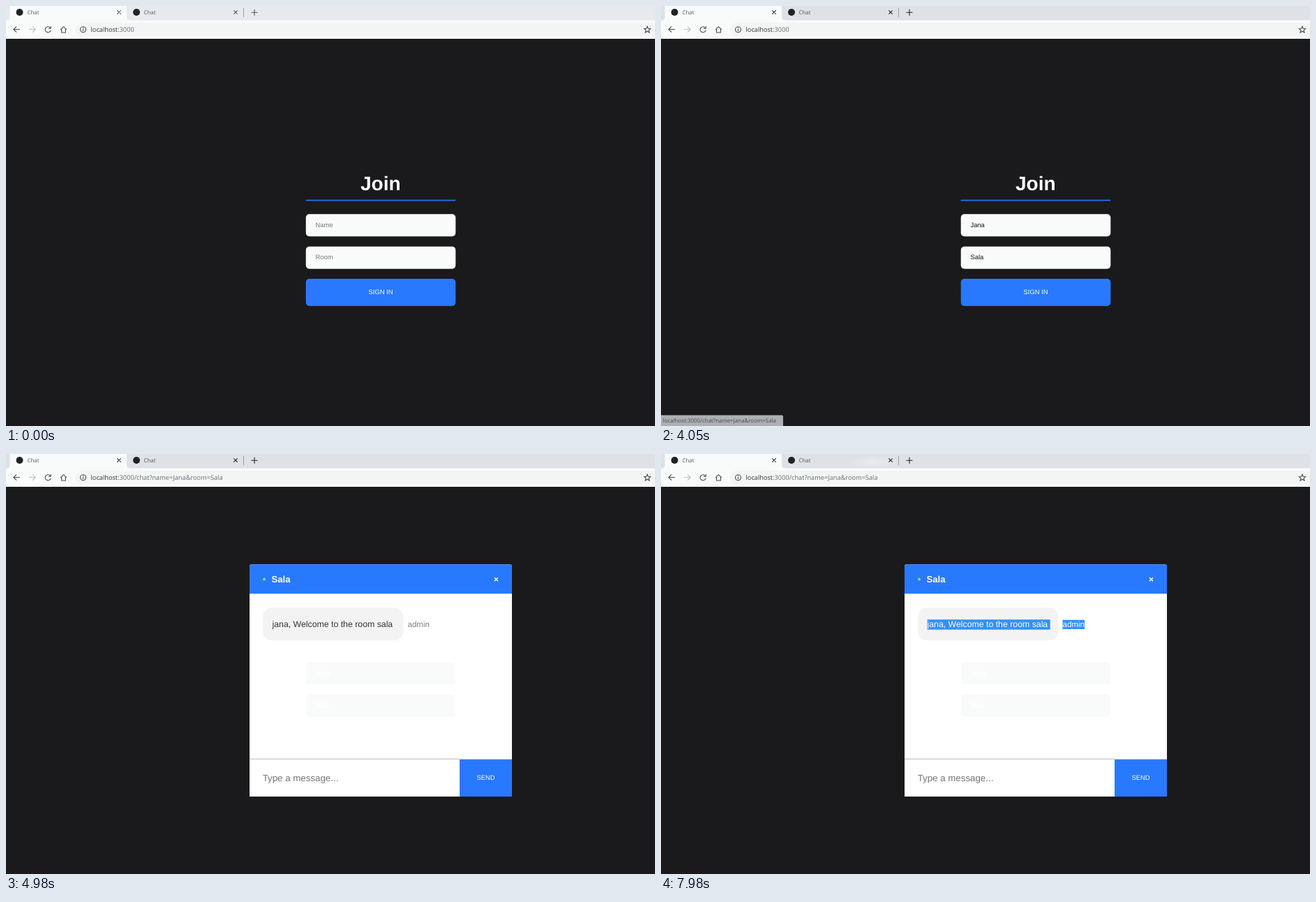
An HTML page for the animation above (8 s loop, 930 px wide and 602 px high).

```html
<!DOCTYPE html>
<html lang="en">
<head>
<meta charset="utf-8">
<title>Chat</title>
<style>
  html, body { margin: 0; width: 100%; height: 100%; overflow: hidden; background: #1a1a1c; }
  svg { display: block; }
  text { font-family: "Liberation Sans", Arial, sans-serif; white-space: pre; text-rendering: geometricPrecision; }
  .ui text, text.ui { font-family: "Open Sans", "Noto Sans", sans-serif; }
  .small { font-size: 9.36px; }
  .bold { font-weight: bold; }
  .message { font-size: 12.3px; }
  .author { font-size: 11.57px; }
  .blue { fill: #2979ff; }
  .white { fill: #fff; }
  .icon { fill: none; stroke: #45494d; stroke-width: 1.1; }
</style>
</head>
<body>
<svg width="930" height="602" viewBox="0 0 930 602">
  <defs>
    <radialGradient id="glow">
      <stop offset="0" stop-color="#eaecef"/>
      <stop offset="1" stop-color="#eaecef" stop-opacity="0"/>
    </radialGradient>
    <clipPath id="selected">
      <rect id="clipMessage" x="381.5" y="237" height="15"/>
      <rect id="clipAuthor" x="575.5" y="237" height="15"/>
    </clipPath>
  </defs>

  <g class="ui">
    <rect id="strip" width="930" height="21"/>
    <rect id="hover" x="266" y="3" width="75" height="17" fill="url(#glow)"/>
    <path d="M2 21Q5.5 20 5.5 16V0H173V16Q173 20 177 21Z" fill="#f9fbfa"/>
    <rect y="20.5" width="930" height="26.5" fill="#f9fbfa"/>
    <rect x="99" y="24" width="850" height="19" rx="9.5" fill="#f3f5f5"/>
    <circle cx="19.5" cy="9" r="5" fill="#222"/>
    <circle cx="187" cy="9" r="5" fill="#222"/>
    <g font-size="7.9" fill="#55595d">
      <text x="30.5" y="12">Chat</text>
      <text x="197.5" y="12">Chat</text>
    </g>
    <path id="tabIcons" class="icon" d="M159.3 6.3l5.4 5.4m0-5.4l-5.4 5.4M326.3 6.3l5.4 5.4m0-5.4l-5.4 5.4M351.5 9.2h9M356 4.7v9"/>
    <path d="M340.5 3v13" stroke="#9a9da1"/>
    <path class="icon" d="M20 33.5H11M15 29.4L10.9 33.5L15 37.6"/>
    <path class="icon" d="M33 33.5h9M38 29.4l4.1 4.1l-4.1 4.1" style="stroke:#bcbfc1"/>
    <path class="icon" d="M63.2 31.2A4 4 0 1 0 64 34.8M64.2 29v3.2H61"/>
    <path class="icon" d="M78.2 33.7L82.5 29.7L86.8 33.7M79.6 33V38H85.4V33"/>
    <circle class="icon" cx="110.5" cy="33.7" r="4"/>
    <path class="icon" d="M110.5 33v3M110.5 31v1"/>
    <path class="icon" d="M919 29.2l1.3 3 3.3.3-2.5 2.2.8 3.3-2.9-1.8-2.9 1.8.8-3.3-2.5-2.2 3.3-.3z"/>
    <text x="121.5" y="37" font-size="9.23" fill="#34373a">localhost<tspan id="path" fill="#6a6e72"></tspan></text>
  </g>

  <g id="join">
    <text class="bold white" x="536.8" y="264" font-size="28" text-anchor="middle">Join</text>
    <rect class="blue" x="429.7" y="277.7" width="214.6" height="1.6"/>
    <rect x="429.7" y="298.3" width="214.6" height="32" rx="5" fill="#f9fbfa"/>
    <rect x="429.7" y="344.7" width="214.6" height="32" rx="5" fill="#f9fbfa"/>
    <rect class="blue" x="429.7" y="391" width="214.6" height="39" rx="5"/>
    <text class="small" id="name" x="443.5" y="317"></text>
    <text class="small" id="room" x="443.5" y="363.3"></text>
    <rect id="caret" width="1" height="11"/>
    <text class="small white" x="537" y="413.3" text-anchor="middle">SIGN IN</text>
  </g>

  <g id="chat">
    <rect x="349" y="158.3" width="376" height="332.7" rx="3" class="white"/>
    <rect x="349" y="480" width="376" height="11" class="white"/>
    <path class="blue" d="M349 200.3V161.3q0-3 3-3H722q3 0 3 3V200.3Z"/>
    <circle cx="370" cy="179.6" r="2" fill="#7be0a0"/>
    <text class="bold white" x="380.6" y="183.6" font-size="13.1">Sala</text>
    <path d="M700 177.2l5 5m0-5l-5 5" stroke="#fff" stroke-width="1.5"/>
    <text class="bold" id="fadedTitle" x="536.8" y="264" font-size="28" text-anchor="middle" fill="#fafafa">Join</text>
    <g fill="#f9fbfa">
      <rect x="429.7" y="298.3" width="214.6" height="32" rx="5"/>
      <rect x="429.7" y="344.7" width="214.6" height="32" rx="5"/>
    </g>
    <g class="small bold white">
      <text x="443.5" y="317">Jana</text>
      <text x="443.5" y="363.3">Sala</text>
    </g>
    <rect x="349" y="436.4" width="301" height="1.6" fill="#d0d2d3"/>
    <rect class="blue" x="650" y="437.6" width="75" height="53.4"/>
    <text x="367.7" y="468.8" font-size="13.3" fill="#757575">Type a message...</text>
    <text class="small white" x="687.5" y="467.2" text-anchor="middle">SEND</text>
    <g id="welcome">
      <rect x="368" y="220.3" width="201.5" height="47" rx="14" fill="#f3f3f3"/>
      <text class="message" id="message" x="381.5" y="248.4" fill="#353535">jana, Welcome to the room sala </text>
      <text class="author" id="author" x="575.5" y="248.2" fill="#828282">admin</text>
      <g clip-path="url(#selected)">
        <rect x="381" y="237.3" width="180" height="14.4" fill="#3390ff"/>
        <rect x="575" y="237.8" width="33" height="13.2" fill="#3390ff"/>
        <text class="message white" x="381.5" y="248.4">jana, Welcome to the room sala </text>
        <text class="author white" x="575.5" y="248.2">admin</text>
      </g>
    </g>
  </g>

  <g id="status">
    <path d="M0 586.5H173q2 0 2 2V602H0Z" fill="#dee1e6"/>
    <text class="ui" x="2.8" y="597.2" font-size="7.92" fill="#55595d">localhost:3000/chat?name=Jana&amp;room=Sala</text>
  </g>
</svg>
<script>
const LOOP = 8000;
const NAME_KEYS = [990, 1200, 1770, 1950];
const ROOM_KEYS = [2580, 2790, 2910, 3000];
const CARET_ON = [[270, 750], [990, 1680], [1770, 2550], [2580, 3480]];
const ROOM_FOCUS = 2070, SUBMIT = 4110, WELCOME = 4980;

const $ = id => document.getElementById(id);
const clamp = v => Math.max(0, Math.min(1, v));
const show = (id, on) => { $(id).style.display = on ? '' : 'none'; };

function typed(id, word, hint, keys, t) {
  const count = keys.filter(k => t >= k).length;
  $(id).textContent = count ? word.slice(0, count) : hint;
  $(id).setAttribute('fill', count ? '#111' : '#757575');
  return count ? $(id).getComputedTextLength() : 0;
}

// Width of the characters whose middle lies left of x.
function selectedWidth(text, x) {
  const start = 1 * text.getAttribute('x');
  let width = 0;
  for (let i = 0; i < text.getNumberOfChars(); i++) {
    const left = text.getStartPositionOfChar(i).x, right = text.getEndPositionOfChar(i).x;
    if (x >= (left + right) / 2) width = right - start;
  }
  return width;
}

function statusOpacity(t) {
  const step = Math.floor(t / 30) * 30;
  return t < 4200 ? clamp((step - 3930) / 160) : clamp((4500 - step) / 150);
}

function draw(t) {
  const active = t >= 270, joined = t >= SUBMIT;
  $('strip').setAttribute('fill', active ? '#dee1e6' : '#e7eaed');
  $('tabIcons').style.stroke = active ? '#222529' : '#54585c';
  show('hover', t >= 7980);
  $('path').textContent = joined ? ':3000/chat?name=Jana&room=Sala' : ':3000';

  show('join', !joined);
  show('chat', joined);
  show('fadedTitle', t < WELCOME);
  show('welcome', t >= WELCOME);
  $('status').style.opacity = statusOpacity(t);

  if (!joined) {
    const nameWidth = typed('name', 'Jana', 'Name', NAME_KEYS, t);
    const roomWidth = typed('room', 'Sala', 'Room', ROOM_KEYS, t);
    const inRoom = t >= ROOM_FOCUS;
    $('caret').setAttribute('x', Math.floor(443.5 + (inRoom ? roomWidth : nameWidth)));
    $('caret').setAttribute('y', inRoom ? 355 : 308.5);
    show('caret', CARET_ON.some(([from, to]) => t >= from && t < to));
  }

  if (t >= WELCOME) {
    const drag = Math.floor(clamp((t - 6690) / 300) * 10) / 10;
    const x = t < 6690 ? 0 : t < 7350 ? 398 + 202 * drag : 610;
    $('clipMessage').setAttribute('width', selectedWidth($('message'), x));
    $('clipAuthor').setAttribute('width', selectedWidth($('author'), x));
  }
}

function tick() {
  draw(performance.now() % LOOP);
  requestAnimationFrame(tick);
}
tick();
</script>
</body>
</html>
```
